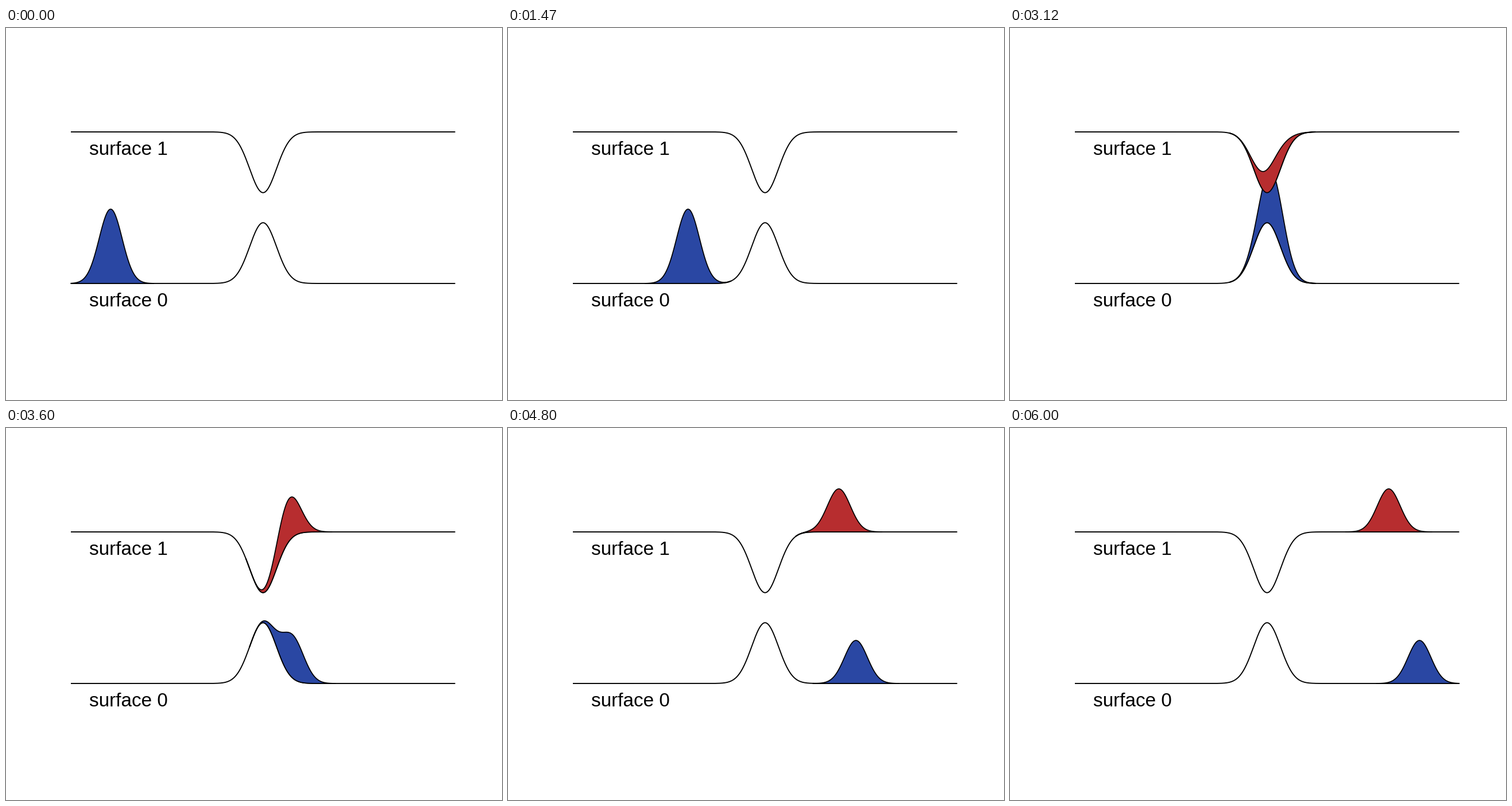
A matplotlib script that plays this animation: 864x648 px, repeating every 6030 ms.

```python
import numpy as np
import matplotlib.pyplot as plt
from matplotlib.animation import FuncAnimation
from matplotlib.patches import Polygon
from math import erf

W, H, DPI = 864, 648, 108
FRAMES, INTERVAL = 201, 30

LEFT, RIGHT, MID = 113.0, 782.5, 447.8
LOWER, UPPER = 445.0, 181.0           # flat levels of the two surfaces
BUMP, BUMP_SIGMA = 105.8, 23.4
FULL, HALF, SIGMA = 129.5, 75.0, 20.0  # packet heights and width
V2_START, V2_SLOPE = 7.185, 0.01075   # squared speed, loss per px climbed
T_CROSS, T_MIX, MIX_SIGMA = 100, 102, 8.0

BLUE, RED = "#2a47a3", "#b72d2f"


def gauss(x, sigma):
    return np.exp(-0.5 * (x / sigma) ** 2)


def lower(x):
    return LOWER - BUMP * gauss(x - MID, BUMP_SIGMA)


def upper(x):
    return UPPER + BUMP * gauss(x - MID, BUMP_SIGMA)


def travel_times(surface, x):
    """Time to reach each x, zero at the crossing, at constant energy."""
    slow = 1 / np.sqrt(V2_START - V2_SLOPE * (LOWER - surface(x)))
    steps = 0.5 * (slow[1:] + slow[:-1]) * np.diff(x)
    t = np.concatenate([[0], np.cumsum(steps)])
    return t - np.interp(MID, x, t)


path_x = np.linspace(LEFT, RIGHT, 2000)
lower_t = travel_times(lower, path_x)
upper_t = travel_times(upper, path_x)


def outline(surface, center, height):
    x = np.linspace(max(center - 75, LEFT), min(center + 75, RIGHT), 300)
    base = surface(x)
    top = base - height * gauss(x - center, SIGMA)
    return np.column_stack([np.r_[x, x[::-1]], np.r_[top, base[::-1]]])


fig = plt.figure(figsize=(W / DPI, H / DPI), dpi=DPI, facecolor="white")
ax = fig.add_axes([0, 0, 1, 1])
ax.set_xlim(0, W)
ax.set_ylim(H, 0)
ax.axis("off")

px = 72 / DPI
curve_x = np.linspace(LEFT, RIGHT, 700)
for surface, level, name in ((upper, UPPER, "surface 1"),
                             (lower, LOWER, "surface 0")):
    ax.plot(curve_x, surface(curve_x), color="black", lw=1.9 * px,
            solid_capstyle="butt", zorder=1)
    ax.text(145.3, level + 39.7, name, fontsize=33.3 * px,
            family="Liberation Sans", color="black", va="baseline")


def packet(color, z):
    patch = Polygon([(0, 0), (1, 0), (0, 1)], closed=True, fc=color,
                    ec="black", lw=1.7 * px, joinstyle="round", zorder=z)
    return ax.add_patch(patch)


blue, red = packet(BLUE, 2), packet(RED, 3)


def update(n):
    t = n - T_CROSS
    mix = 0.5 * (1 + erf((n - T_MIX) / (MIX_SIGMA * 2 ** 0.5)))
    blue_x = np.interp(t, lower_t, path_x)
    red_x = np.interp(t, upper_t, path_x) if t > 0 else blue_x
    blue.set_xy(outline(lower, blue_x, FULL + (HALF - FULL) * mix))
    red.set_xy(outline(upper, red_x, HALF * mix))
    red.set_visible(HALF * mix > 0.5)
    return blue, red


anim = FuncAnimation(fig, update, frames=FRAMES, interval=INTERVAL,
                     repeat=True, repeat_delay=0, blit=False)
plt.show()
```
